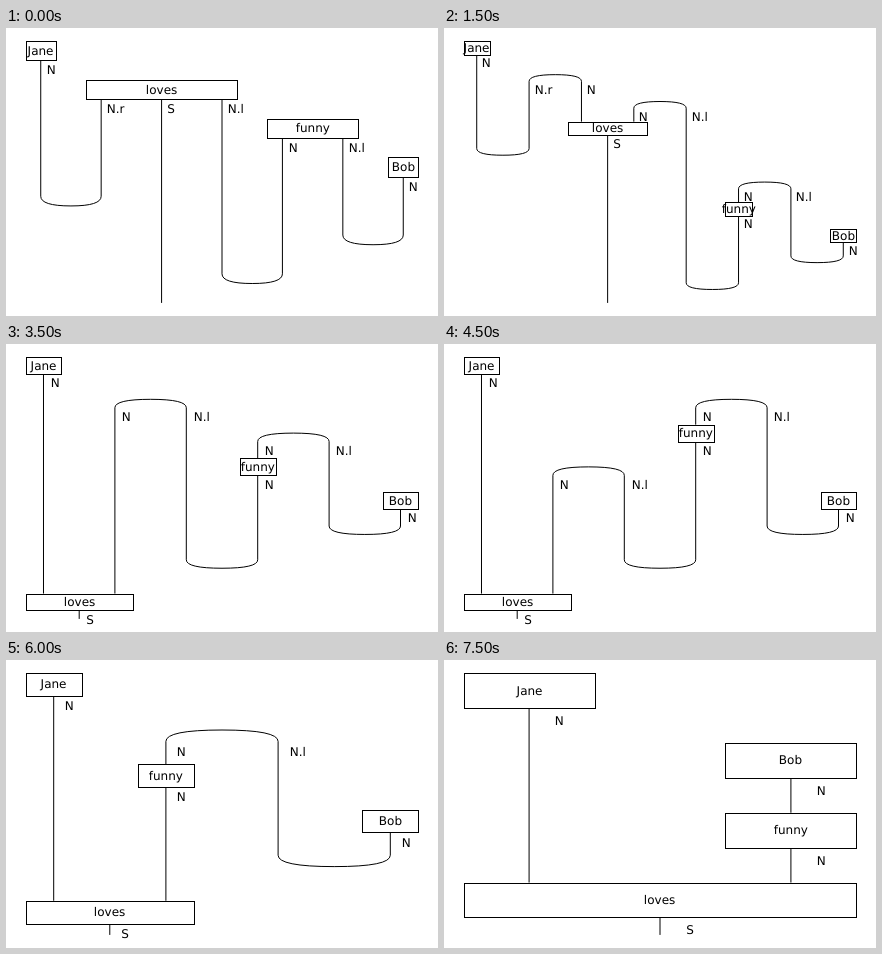
These frames come from a looping animation (432x288 px, 8000 ms). An HTML page:

```html
<!DOCTYPE html>
<html lang="en">
<head>
<meta charset="utf-8">
<title>Straightening a sentence diagram</title>
<style>
  html, body { margin: 0; width: 100%; height: 100%; overflow: hidden; background: #fff; }
  svg { display: block; width: 432px; height: 288px; }
  text { font: 12px "DejaVu Sans", sans-serif; fill: #000; text-rendering: geometricPrecision; white-space: pre; }
  path, rect { stroke: #000; stroke-width: 1; fill: none; }
  rect { fill: #fff; }
</style>
</head>
<body>
<svg id="stage" viewBox="0 0 432 288" xmlns="http://www.w3.org/2000/svg"></svg>
<script>
const STEP = 500;
const W = 432, H = 288;
const LEFT = W / 22, TOP = H / 22;            // 5% margin around the diagram
const SPAN_X = W / 1.1, SPAN_Y = H / 1.1;
const FONT = 12;
const BEARING = { J: -0.052, N: 0.098, S: 0.066, B: 0.098, l: 0.094, f: 0.023 };

const box = (name, ins, outs) => ({ kind: "box", name, ins, outs });
const cap = (p, q, left, right) => ({ kind: "cap", ins: [], outs: [[p, left], [q, right]] });
const cup = (p, q) => ({ kind: "cup", ins: [p, q], outs: [] });

// Words whose adjoint types hang directly below them
const plain = {
  J: box("Jane", [], [[0, "N"]]),
  L: box("loves", [], [[1, "N.r"], [2, "S"], [3, "N.l"]]),
  F: box("funny", [], [[4, "N"], [5, "N.l"]]),
  B: box("Bob", [], [[6, "N"]]),
  a: cup(0, 1), b: cup(5, 6), c: cup(3, 4)
};

// Words as functions, with wires bent by caps
const bent = {
  J: box("Jane", [], [[0, "N"]]),
  L: box("loves", [2, 3], [["mid", "S"]]),
  F: box("funny", [5], [[5, "N"]]),
  B: box("Bob", [], [[7, "N"]]),
  x: cap(1, 2, "N.r", "N"), y: cap(3, 4, "N", "N.l"), z: cap(5, 6, "N", "N.l"),
  a: cup(0, 1), b: cup(6, 7), c: cup(4, 5)
};

// Each phase: parts, column of every wire, and the row orders it passes through
const phases = [
  [plain, "0123456", "JLFBabc"],
  [bent, "01234567", "JxyLzFaBbc JxyLzaFBbc JxyLazFBbc JxyaLzFBbc JxayLzFBbc"],
  [bent, "00012345", "JyLzFBbc JyzFBbcL JzyFBbcL JzFyBbcL JzFBybcL JzFBbycL"],
  [bent, "00011123", "JzFBbL JzBbFL JBzbFL"],
  [bent, "00011111", "JBFL"]
];
const states = phases.flatMap(([parts, cols, orders]) =>
  orders.split(" ").map(rows => ({ parts, cols: [...cols].map(Number), rows })));

const pen = document.createElement("canvas").getContext("2d");
pen.font = FONT + 'px "DejaVu Sans", sans-serif';
const snap = v => Math.floor(v + 0.5) + 0.5;

function word(s, x, y) {
  const b = BEARING[s[0]] * FONT;
  return `<text x="${Math.round(x + b) - b}" y="${Math.round(y)}">${s}</text>`;
}

function draw({ parts, cols, rows }) {
  const ux = SPAN_X / (Math.max(...cols) + 0.5);
  const uy = SPAN_Y / (rows.length - 0.25);
  const xAt = col => LEFT + (col + 0.25) * ux;
  const open = new Map();                     // column -> y where its wire begins
  let lines = "", boxes = "", texts = "";
  const wire = (col, y) => {
    lines += `<path d="M${xAt(col)} ${open.get(col)}V${y}"/>`;
    open.delete(col);
  };

  [...rows].forEach((key, i) => {
    const part = parts[key];
    const yc = TOP + (i + 0.25) * uy;
    const y0 = yc - uy / 4, y1 = yc + uy / 4;
    const ins = part.ins.map(w => cols[w]);
    const outs = part.outs.map(([w, type]) =>
      [w === "mid" ? (ins[0] + ins[1]) / 2 : cols[w], type]);
    const used = ins.concat(outs.map(o => o[0]));
    const lo = Math.min(...used), hi = Math.max(...used);

    ins.forEach(col => wire(col, y0));
    if (part.kind === "box") {
      const x0 = snap(xAt(lo - 0.25)), x1 = snap(xAt(hi + 0.25));
      const top = snap(y0), bottom = snap(y1);
      boxes += `<rect x="${x0}" y="${top}" width="${x1 - x0}" height="${bottom - top}"/>`;
      texts += word(part.name, xAt((lo + hi) / 2) - pen.measureText(part.name).width / 2, yc + 4);
    } else {
      const y = part.kind === "cap" ? y1 : y0;
      const xl = xAt(lo), xr = xAt(hi), xm = (xl + xr) / 2;
      lines += `<path d="M${xl} ${y}Q${xl} ${yc} ${xm} ${yc}Q${xr} ${yc} ${xr} ${y}"/>`;
    }
    outs.forEach(([col, type]) => {
      open.set(col, y1);
      texts += word(type, xAt(col) + ux / 10, y1 + uy / 10 + 10);
    });
  });
  [...open.keys()].forEach(col => wire(col, TOP + SPAN_Y));
  return lines + boxes + texts;
}

const stage = document.getElementById("stage");
let shown = -1;
function render(time) {
  const n = Math.floor(time / STEP) % states.length;
  if (n !== shown) {
    stage.innerHTML = draw(states[n]);
    shown = n;
  }
}
function tick() {
  render(performance.now() - start);
  requestAnimationFrame(tick);
}
const start = performance.now();
tick();
</script>
</body>
</html>
```
